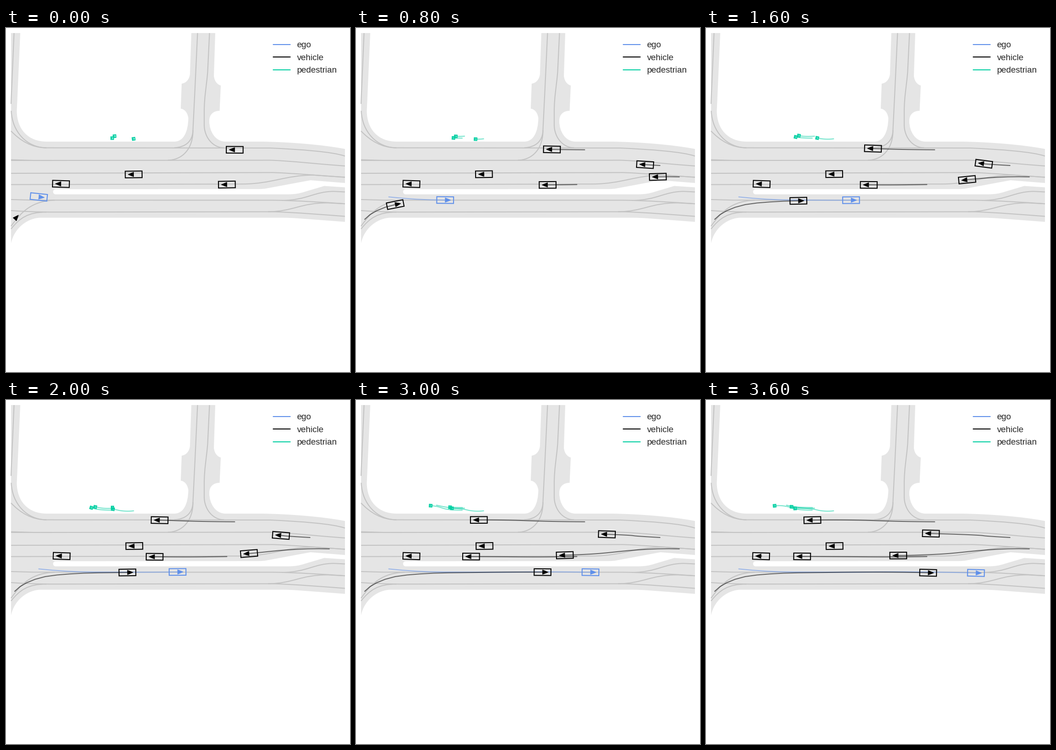
A matplotlib script for the animation above (3.8 s loop, 748 px wide and 748 px high).

```python
import numpy as np
import matplotlib.pyplot as plt
from matplotlib.animation import FuncAnimation
from matplotlib.patches import PathPatch, Polygon
from matplotlib.path import Path

SIZE, DPI = 748, 100
FRAMES, STEP = 19, 200
MAP_LEFT = 11
LW = 1.5
EGO, VEHICLE, PEDESTRIAN = "#6090ea", "#000000", "#00cfa2"
ROAD, LANE = "#e5e5e5", "#c3c3c3"

plt.rcParams["font.family"] = "Liberation Sans"
fig = plt.figure(figsize=(SIZE / DPI, SIZE / DPI), dpi=DPI, facecolor="white")
ax = fig.add_axes([0, 0, 1, 1])
ax.set_xlim(0, SIZE)
ax.set_ylim(SIZE, 0)
ax.axis("off")

CODES = {"M": Path.MOVETO, "L": Path.LINETO, "C": Path.CURVE4}


def make_path(text):
    """Build a path from M, L and C commands with absolute points."""
    points, codes, code = [], [], None
    for word in text.split():
        if word in CODES:
            code = CODES[word]
        else:
            points.append([float(v) for v in word.split(",")])
            codes.append(code)
    return Path(points, codes)


# --- map ---
ROAD_EDGE = """
M 11,11 L 31,11 L 23.5,180 C 23.5,220 48,247 88,247 L 366,247
C 386,247 396,226 396.5,196 C 395,184 388,176 380,175.5 L 382,121
C 391,120 399,112 400,100 L 403,11 L 455,11 L 452,104
C 453,115 459,123 467,125 L 464.5,180 C 451,180 442,188 442,202
C 442,226 456,247 477,247 L 555,247 C 620,248 690,254 737,263
L 737,337 L 662,331 L 568,348.5 C 561,350 556,350 548,350.2
L 108,350.5 C 100.5,350.5 100.5,361.7 108,361.7 L 610,361.7
C 630,361.7 637,360 650,356 L 692,343.5 L 737,346.5
L 737,421.5 L 637,414 C 622,413 612,412.5 600,412.5
L 76,412.5 C 48,412.5 18,434 11,468 L 11,11
"""

LANES = [
    # side roads and their turns
    "M 17.5,11 L 12,140 L 11,165",
    "M 11.5,180 C 13,226 46,260.5 88,260.5",
    "M 11,224 C 31,245 56,260.5 88,260.5",
    "M 366,260.5 C 391,259 406,246 406.5,222 L 411,130 L 416.5,11",
    "M 352,287.5 C 384,287 407,262 406.5,222",
    "M 442.5,11 L 438.5,95 C 436,127 431,150 431,182 L 431,210"
    " C 431,238 450,260.5 474,260.5",
    # westbound
    "M 88,260.5 L 575,261 C 640,264 710,269 737,278.5",
    "M 11,286.5 L 60,288 L 575,287.5 C 620,289 680,296 737,300",
    "M 11,288 L 100,288",
    "M 11,316 L 580,314.3 C 630,316 680,321 737,324.5",
    "M 11,340.5 L 515,339.3 C 580,338.5 605,320.5 668,319.7 L 737,324.5",
    # eastbound
    "M 11,373 L 60,374.3 L 580,374.5 C 630,375 690,379 737,382.2",
    "M 11,431 C 33,400 56,376 106,374.4",
    "M 600,375 C 655,374.5 670,355.3 713,355.3 L 737,356.5",
    "M 11,397 C 40,399 70,400.3 108,400.3 L 580,399.5 C 630,401 690,406 737,409.5",
    "M 11,437 C 30,413 48,400.3 88,400.3",
    "M 570,399.5 C 625,399 640,380 700,380.3 L 737,382.2",
]

ax.add_patch(PathPatch(make_path(ROAD_EDGE), fc=ROAD, ec="none", zorder=0))
for lane in LANES:
    ax.add_patch(PathPatch(make_path(lane), fc="none", ec=LANE, lw=LW,
                           capstyle="butt", zorder=1))

# --- legend ---
LEGEND = [("ego", EGO), ("vehicle", VEHICLE), ("pedestrian", PEDESTRIAN)]
for row, (label, color) in enumerate(LEGEND):
    y = 36.2 + 27.2 * row
    ax.plot([581, 618], [y, y], color=color, lw=LW, solid_capstyle="round")
    ax.text(632.6, y + 6.2, label, size=13.5, color="#262626", va="baseline")


# --- moving agents ---
BOX = np.array([(-.5, -.5), (.5, -.5), (.5, .5), (-.5, .5)])
ARROW = np.array([(0, -.35), (.34, 0), (0, .35)])
CAR, WALKER = (36.5, 14.4), (5.6, 5.6)


def glide(t, keys, values):
    """Smooth cubic curve through the key values."""
    keys, values = np.asarray(keys, float), np.asarray(values, float)
    slopes = np.gradient(values, keys, edge_order=2)
    i = np.clip(np.searchsorted(keys, t, side="right") - 1, 0, len(keys) - 2)
    h = keys[i + 1] - keys[i]
    u = (t - keys[i]) / h
    return ((1 + 2 * u) * (1 - u) ** 2 * values[i]
            + u * (1 - u) ** 2 * h * slopes[i]
            + u * u * (3 - 2 * u) * values[i + 1]
            + u * u * (u - 1) * h * slopes[i + 1])


class Agent:
    """A box with an arrow along its way and a trail behind it."""

    def __init__(self, color, size, *keys, heading=None):
        steps, xs, ys = zip(*keys)
        self.start, self.stop = steps[0], steps[-1]
        self.size = size
        t = np.arange(self.start, self.stop + 1)
        self.x, self.y = glide(t, steps, xs), glide(t, steps, ys)
        if heading is None:
            self.turn = np.arctan2(np.gradient(self.y, edge_order=2),
                                   np.gradient(self.x, edge_order=2))
        else:
            self.turn = np.full(len(t), np.radians(heading))
        self.trail, = ax.plot([], [], color=color, alpha=0.55, lw=LW,
                              solid_capstyle="round", solid_joinstyle="round",
                              zorder=3)
        self.box = ax.add_patch(Polygon(BOX, fc="none", ec=color, lw=LW,
                                        joinstyle="miter", zorder=4))
        self.arrow = ax.add_patch(Polygon(ARROW, fc=color, ec=color, lw=0.5,
                                          zorder=4))

    def place(self, shape, i):
        c, s = np.cos(self.turn[i]), np.sin(self.turn[i])
        return shape * self.size @ [[c, s], [-s, c]] + [self.x[i], self.y[i]]

    def show(self, frame):
        i = frame - self.start
        n = max(0, i + 1)
        self.trail.set_data(self.x[:n], self.y[:n])
        self.trail.set_visible(i > 0)
        alive = self.start <= frame <= self.stop
        self.arrow.set_visible(alive)
        self.box.set_visible(alive)
        if alive:
            corners = self.place(BOX, i)
            self.box.set_xy(corners)
            self.box.set_visible(corners[:, 0].min() > MAP_LEFT)
            self.arrow.set_xy(self.place(ARROW, i))


# keys: step, x, y
agents = [
    Agent(EGO, CAR, (0, 71.3, 367.3), (2, 131.5, 372.3), (6, 256, 374.4),
          (12, 429, 373.7), (18, 587, 376)),
    # turning in behind the ego car
    Agent(VEHICLE, CAR, (0, 19, 416), (2, 45, 397.3), (4, 85.3, 384),
          (6, 139.3, 378.2), (10, 264, 375), (18, 483, 375.6)),
    # westbound
    Agent(VEHICLE, CAR, (0, 497.3, 264.8), (4, 426, 264), (10, 334, 261.3),
          (18, 231.3, 261.2)),
    Agent(VEHICLE, CAR, (0, 480.3, 340.4), (4, 416.7, 341.2),
          (12, 293.3, 340.7), (18, 209, 340.1)),
    Agent(VEHICLE, CAR, (1, 661, 299), (6, 612.5, 296), (11, 591.5, 294),
          (15, 545.5, 292), (18, 489, 290.3)),
    Agent(VEHICLE, CAR, (2, 703, 323.7), (4, 656.3, 323.6), (6, 611, 326),
          (10, 528.5, 333.8), (14, 467.5, 337), (18, 418, 338.2)),
    # waiting
    Agent(VEHICLE, CAR, (0, 277.6, 318.4), (9, 278.9, 317.6),
          (18, 279.5, 317.6), heading=179.2),
    Agent(VEHICLE, CAR, (0, 119.5, 339), (9, 121, 339.2),
          (18, 119.8, 339.6), heading=181.8),
    # on foot
    Agent(PEDESTRIAN, WALKER, (0, 236, 235.2), (4, 217, 235.7),
          (10, 194, 232.6), (14, 175, 228.7)),
    Agent(PEDESTRIAN, WALKER, (0, 231, 239.5), (4, 212, 239), (8, 195, 237),
          (12, 176, 231.5), (18, 149.2, 230)),
    Agent(PEDESTRIAN, WALKER, (0, 277.5, 241), (6, 251, 240.9),
          (10, 232.5, 237.3), (18, 193.8, 235.8)),
    Agent(PEDESTRIAN, WALKER, (10, 231.5, 233.8), (14, 210.3, 233.4),
          (18, 186, 232.2)),
]


def draw(frame):
    for agent in agents:
        agent.show(frame)
    return []


anim = FuncAnimation(fig, draw, frames=FRAMES, interval=STEP, repeat=True,
                     repeat_delay=0, blit=False)
plt.show()
```
